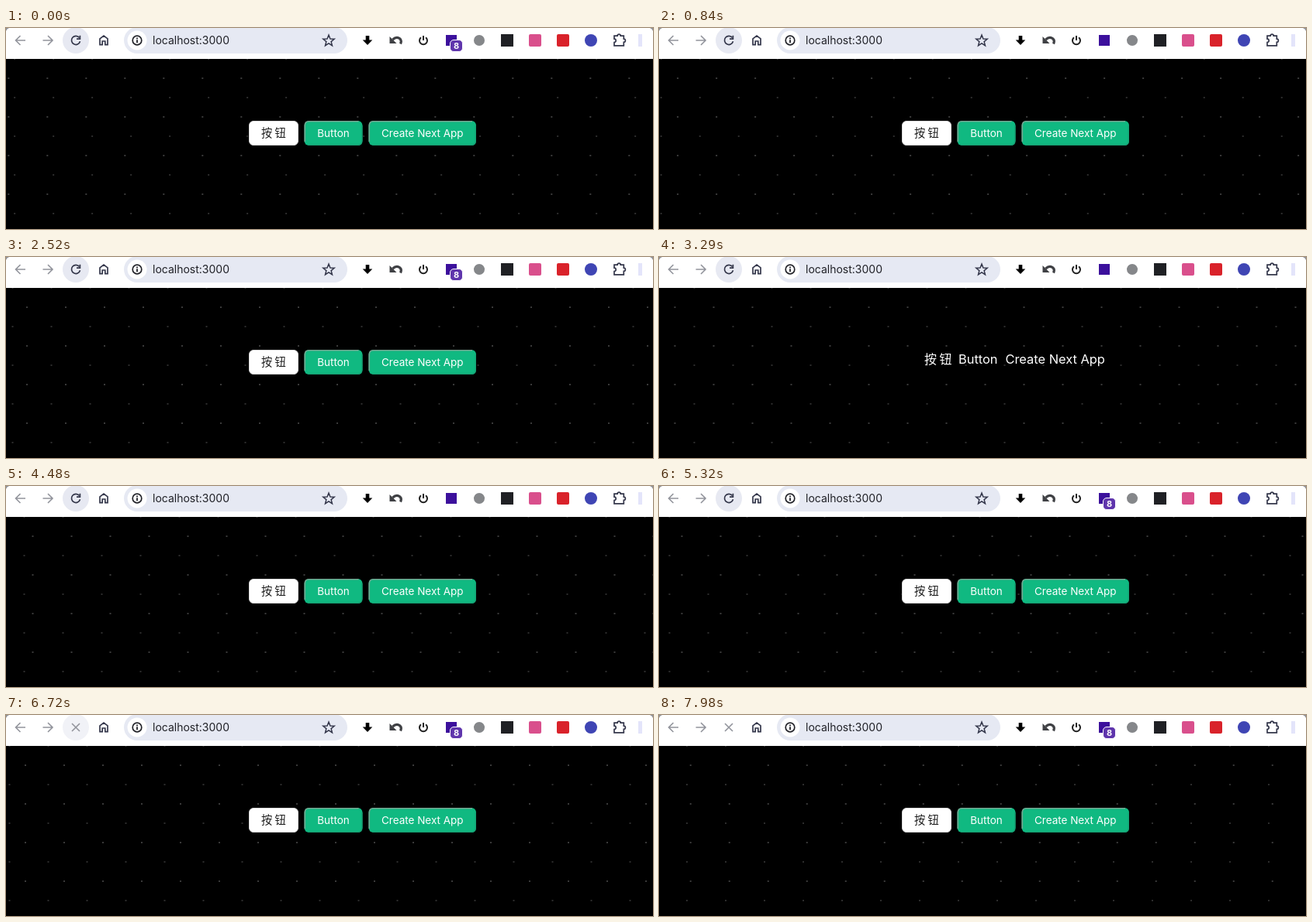
Animation, 834 px wide and 260 px high, one loop 8 s. Source, as an HTML page:

```html
<!DOCTYPE html>
<html lang="en">
<head>
<meta charset="utf-8">
<title>Browser reload</title>
<style>
  html, body { margin: 0; width: 100%; height: 100%; overflow: hidden; background: #000; }
  svg { display: block; width: 834px; height: 260px; }
  text { font-family: Inter, "Noto Sans CJK SC", "Noto Sans CJK", sans-serif; }
  .cjk { font-family: "Noto Sans CJK SC", "Noto Sans CJK", sans-serif; }
  .line { fill: none; stroke: #33364a; stroke-width: 1.7; }
  .dim { stroke: #92949c; stroke-width: 1.6; }
  .label { font-size: 13.5px; fill: #fff; }
  .plain { font-size: 16.4px; fill: #fff; }
</style>
</head>
<body>
<svg viewBox="0 0 834 260">
  <defs>
    <pattern id="near" width="50" height="50" patternUnits="userSpaceOnUse">
      <circle cx="25" cy="25" r="1" fill="#4c4c4c"/>
    </pattern>
    <pattern id="far" width="50" height="50" patternUnits="userSpaceOnUse">
      <circle cx="25" cy="25" r="1" fill="#3a3a3a"/>
    </pattern>
  </defs>

  <rect width="834" height="260"/>
  <rect y="40" width="834" height="220" fill="url(#near)"/>
  <rect y="40" width="834" height="220" fill="url(#far)"/>

  <g id="styled">
    <rect x="313.5" y="120.5" width="63" height="31" rx="5.5" fill="#fff" stroke="#d9d9d9"/>
    <text class="cjk" x="329" y="141.3" font-size="14.3" fill="#1f1f1f">按 钮</text>
    <g id="greens"></g>
  </g>
  <g id="bare">
    <text class="plain cjk" x="342" y="138" style="font-size:16px">按 钮</text>
    <text class="plain" x="386" y="138">Button</text>
    <text class="plain" x="446.5" y="138">Create Next App</text>
  </g>

  <rect width="834" height="40" fill="#fff"/>
  <path d="M0 0H4Q1 1 0 4ZM834 0H830Q833 1 834 4Z" fill="#8e9096"/>
  <path class="line dim" d="M25 16H13M18.5 10L12.5 16L18.5 22M47.5 16H59.5M54 10L60 16L54 22"/>
  <circle id="halo" cx="90" cy="16" r="17"/>
  <g id="reload" class="line">
    <path d="M94.6 12.6A5.6 5.6 0 1 0 95.5 17.3"/>
    <path d="M95.4 9.8V14.2H91"/>
  </g>
  <path id="stop" class="line dim" d="M85 11L95 21M95 11L85 21"/>
  <path class="line" d="M121 21.6V13.8L126 10L131 13.8V21.6H127.8V17H124.2V21.6Z"/>

  <rect x="152" y="-1" width="288" height="34" rx="17" fill="#e6e9f3"/>
  <circle cx="169" cy="16" r="12.5" fill="#fff"/>
  <circle class="line" cx="169" cy="16" r="5.8" style="stroke:#202127"/>
  <path d="M168.1 15.2H169.9V19.3H168.1ZM168.1 12.5H169.9V14.2H168.1Z" fill="#202127"/>
  <text x="189" y="21" font-size="14" fill="#202127">localhost:3000</text>
  <path id="star" class="line" style="stroke-width:1.5"/>

  <path d="M463.7 10H468.3V15.5H472.3L466 22L459.7 15.5H463.7Z"/>
  <path d="M508.5 20.5C511.5 13.5 504 9.5 498.5 15" fill="none" stroke="#3f4044" stroke-width="3.2"/>
  <path d="M494.5 11V20H503.5Z" fill="#3f4044"/>
  <path class="line" style="stroke:#222;stroke-width:2" d="M535 12.3A5 5 0 1 0 541 12.3M538 10V16"/>
  <rect x="567" y="9" width="14" height="14" fill="#3c109c"/>
  <g id="badge">
    <rect x="572.5" y="15.5" width="16" height="15" rx="4.5" fill="#5f35ac" stroke="#fff"/>
    <text x="580.5" y="27" font-size="11" font-weight="700" fill="#fff" text-anchor="middle">8</text>
  </g>
  <circle cx="610" cy="16" r="7" fill="#85878a"/>
  <rect x="638" y="8" width="16" height="16" fill="#1f2024"/>
  <rect x="674" y="8" width="16" height="16" rx="2" fill="#d94f8c"/>
  <rect x="710" y="8" width="16" height="16" rx="2" fill="#d9222a"/>
  <circle cx="754" cy="16" r="8" fill="#3f45b4"/>
  <path class="line" d="M784 10.2H788.2A2 2 0 0 1 792.2 10.2H796.3V14.2A2 2 0 0 1 796.3 18.4V22.8H784V18.6A2.2 2.2 0 0 0 784 14.2Z"/>
  <rect x="815" y="8" width="5" height="16" fill="#e3e4fa"/>
</svg>
<script>
const LOOP = 8000, STEP = 70, SPEED = 0.0125;
// Each reload: moment the old page goes, moment the new page starts moving.
const RELOADS = [[-2700, -2625], [400, 550], [1930, 2000], [3260, 3360], [4530, 4600], [6270, 6360]];
// Spans in which the extension badge is missing.
const NO_BADGE = [[400, 900], [1930, 2450], [3260, 4970], [6270, 6600]];
const STOP_AT = 6580;

const $ = id => document.getElementById(id);
const show = (id, on) => $(id).setAttribute('visibility', on ? 'visible' : 'hidden');
const clamp = v => Math.max(0, Math.min(1, v));
const mix = (a, b, k) => `rgb(${a.map((v, i) => Math.round(v + (b[i] - v) * k))})`;

const WHITE = [255, 255, 255], HOVER = [231, 233, 242], PRESSED = [217, 218, 226];

function greenButton(x, w, label) {
  const r = x + w;
  return `<rect x="${x}" y="120" width="${w}" height="32" rx="6" fill="#10b981"/>
    <path d="M${x + .8} 147V126Q${x + .8} 120.8 ${x + 6} 120.8H${r - 5}" fill="none" stroke="#74a792" stroke-width="1.6"/>
    <path d="M${x + 5} 151.3H${r - 6}Q${r - .7} 151.3 ${r - .7} 146V126" fill="none" stroke="#16a375" stroke-width="1.4"/>
    <text class="label" x="${x + w / 2}" y="141" text-anchor="middle">${label}</text>`;
}

function starPath(cx, cy) {
  const pts = Array.from({ length: 10 }, (_, i) => {
    const a = i * Math.PI / 5 - Math.PI / 2, r = i % 2 ? 3.3 : 7.6;
    return `${(cx + r * Math.cos(a)).toFixed(2)} ${(cy + r * Math.sin(a)).toFixed(2)}`;
  });
  return `M${pts.join('L')}Z`;
}

$('greens').innerHTML = greenButton(384.5, 75, 'Button') + greenButton(467.5, 138.5, 'Create Next App');
$('star').setAttribute('d', starPath(416, 16.6));

function haloColor(t) {
  if (t >= STOP_AT) return mix(HOVER, WHITE, clamp((t - STOP_AT) / 350));
  const press = Math.max(...RELOADS.map(([, start]) =>
    Math.min(clamp((t - start + 340) / 80), clamp((start - 125 - t) / 50))));
  return mix(HOVER, PRESSED, press);
}

function draw(t) {
  const [gone, start] = RELOADS.filter(r => r[0] <= t).pop();
  const shift = Math.max(0, t - start) * SPEED;
  const bare = t >= gone && t < start;

  $('near').setAttribute('patternTransform', `translate(${(shift - 4.5) % 50} 40)`);
  $('far').setAttribute('patternTransform', `translate(${(2 * shift + 20.5) % 50} 15)`);
  show('bare', bare);
  show('styled', !bare);
  show('badge', !NO_BADGE.some(([a, b]) => t >= a && t < b));
  show('stop', t >= STOP_AT);
  show('reload', t < STOP_AT);
  $('halo').setAttribute('fill', haloColor(t));
}

const origin = performance.now();
function tick() {
  const t = (performance.now() - origin) % LOOP;
  draw(t - t % STEP);
  requestAnimationFrame(tick);
}
draw(0);
requestAnimationFrame(tick);
</script>
</body>
</html>
```
